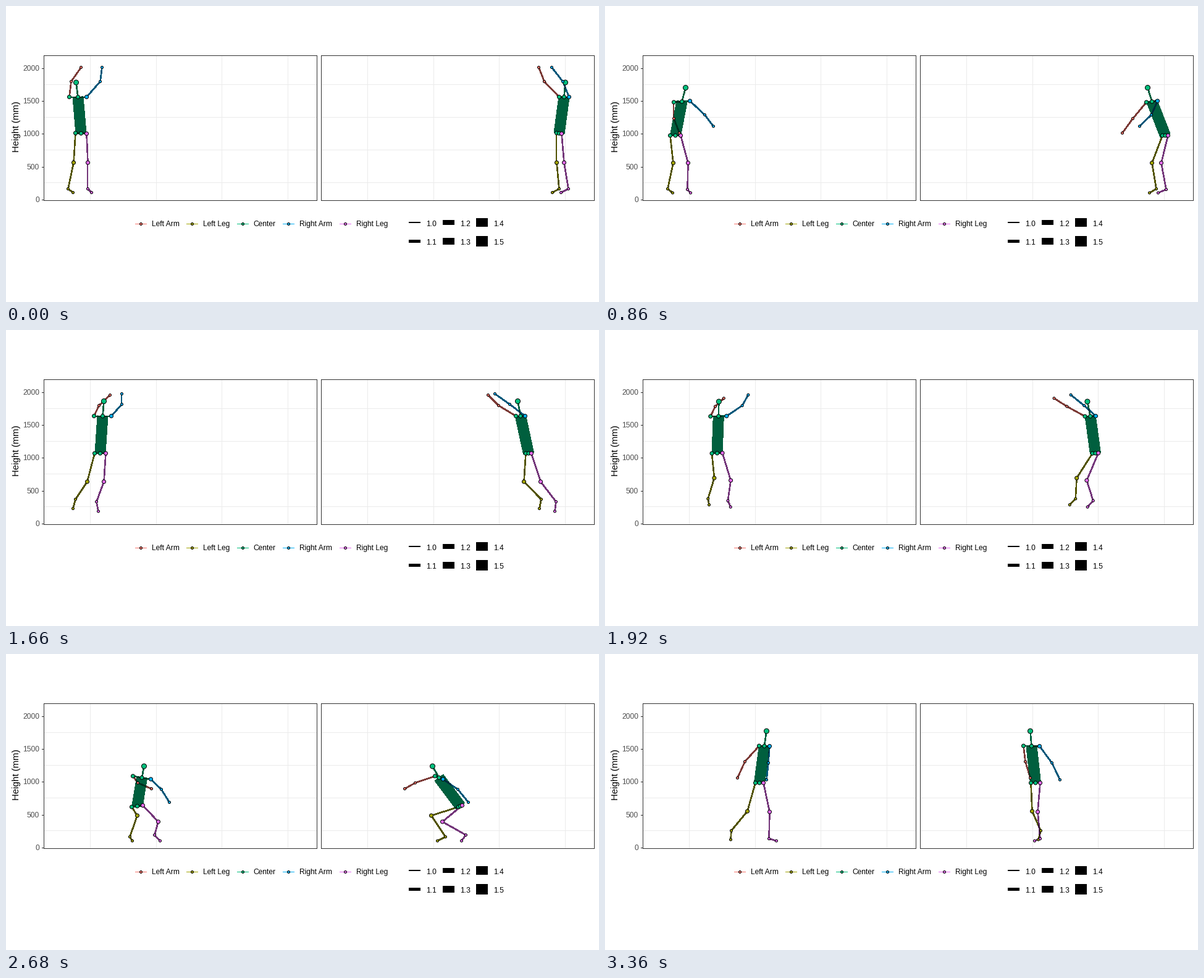
Write a matplotlib script that moves like this. It is 960 by 480 pixels and loops after 3380 ms.

```python
import numpy as np
import matplotlib.pyplot as plt
from matplotlib.animation import FuncAnimation
from matplotlib.collections import LineCollection
from matplotlib.patches import Rectangle

W, H, DPI = 960, 480, 80
PT = 72 / DPI  # points per pixel
STEP, FRAMES = 20, 169

plt.rcParams["font.family"] = "Liberation Sans"
HUES = dict(la="#F8766D", ll="#A3A500", c="#00BF7D", ra="#00B0F6", rl="#E76BF3")
LABELS = dict(la="Left Arm", ll="Left Leg", c="Center", ra="Right Arm", rl="Right Leg")

# Keyed joints: time in ms, then (x in left panel, x in right panel, y).
tracks = {}


def pose(t, **joints):
    for name, p in joints.items():
        tracks.setdefault(name, []).append((t, *p))


pose(0, head=(113, 905, 123.5), lsh=(102, 895, 147), rsh=(130, 911, 147),
     lel=(105, 871, 122), lwr=(121, 862, 99), rel=(152, 901, 122), rwr=(155, 883, 99),
     lhip=(112, 891, 205.5), rhip=(130, 899, 206.5),
     lkn=(109, 891, 253.5), lan=(100, 895, 296), lto=(108, 884, 302),
     rkn=(132, 903, 253.5), ran=(132, 910, 296), rto=(138, 898, 302))
pose(300, lsh=(104, 893, 144), rsh=(131, 909, 144), lel=(108, 869, 119),
     lwr=(124, 858, 94), rel=(153, 897, 118), rwr=(158, 878, 94))
pose(540, head=(120, 898, 122), lsh=(106, 890, 145), rsh=(133, 907, 145),
     lel=(112, 866, 121), lwr=(127, 853, 96), rel=(154, 893, 119), rwr=(160, 873, 96),
     lhip=(109, 895, 206), rhip=(127, 903, 206))
pose(860, head=(130, 878, 132), lsh=(111, 876, 155.5), rsh=(137, 894, 153.5),
     lel=(111, 854, 182), lwr=(120, 837, 205.5), rel=(161, 884, 176), rwr=(175, 865, 194.5),
     lhip=(105, 902, 209.5), rhip=(122, 911, 209.5),
     lkn=(110, 885, 254), lan=(101, 892, 296), lto=(109, 881, 302.5),
     rkn=(134, 900, 254), ran=(133, 908, 297), rto=(138, 895, 302.5))
pose(1080, head=(140, 863, 159), lsh=(117, 865, 177), rsh=(145, 882, 177),
     lel=(97, 892, 187), lwr=(82, 916, 193), rel=(138, 914, 184), rwr=(116, 932, 189),
     lhip=(106, 900, 222), rhip=(123, 909, 222))
pose(1300, head=(152, 844, 189), lsh=(127, 848, 200.5), rsh=(155, 864, 201.5),
     lel=(99, 869, 198), lwr=(83, 893, 202.5), rel=(148, 897, 195), rwr=(130, 921, 197.5),
     lhip=(110, 892, 230.5), rhip=(127, 902, 230.5),
     lkn=(124, 864, 265.5), lan=(106, 886, 297), lto=(112, 874, 303),
     rkn=(146, 877, 264.5), ran=(134, 902, 298), rto=(142, 890, 303))
pose(1480, head=(152, 841, 155), lsh=(132, 842, 177), rsh=(160, 858, 177),
     lel=(126, 850, 210), lwr=(132, 842, 237), rel=(170, 864, 209), rwr=(178, 856, 236),
     lhip=(120, 875, 222), rhip=(138, 885, 222))
pose(1540, lan=(107, 881, 290), lto=(111, 873, 303), ran=(137, 897, 291), rto=(143, 888, 303))
pose(1660, head=(158, 828, 115), lsh=(142, 825, 139), rsh=(170, 840, 139),
     lel=(150, 797, 122), lwr=(168, 780, 105), rel=(187, 815, 120), rwr=(187, 791, 103),
     lhip=(143, 841, 199.5), rhip=(161, 850, 199.5),
     lkn=(131, 838, 245.5), lan=(112, 866, 274), lto=(108, 863, 289),
     rkn=(158, 865, 245.5), ran=(146, 890, 278), rto=(149, 888, 293.5))
pose(1800, head=(172, 804, 105), lsh=(156, 800, 129), rsh=(184, 815, 129),
     lel=(167, 774, 110), lwr=(183, 758, 94), rel=(203, 791, 109), rwr=(204, 768, 91),
     lhip=(158, 814, 190), rhip=(175, 823, 190),
     lkn=(154, 796, 234), lan=(136, 824, 262), lto=(136, 818, 276),
     rkn=(177, 815, 237), ran=(165, 845, 266), rto=(167, 841, 281))
pose(2000, head=(190, 766, 127), lsh=(178, 762, 151), rsh=(203, 781, 150),
     lhip=(181, 774, 210), rhip=(198, 784, 209),
     lkn=(189, 744, 246), lan=(185, 728, 285), lto=(188, 716, 291),
     rkn=(218, 760, 250), ran=(222, 762, 287), rto=(228, 750, 293))
pose(2080, lan=(197, 716, 297), lto=(202, 702, 302), ran=(239, 752, 297), rto=(245, 739, 302))
pose(2200, head=(199, 740, 158), lsh=(188, 734, 182.5), rsh=(213, 754, 180.5),
     lel=(182, 700, 184), lwr=(187, 671, 186), rel=(245, 764, 186), rwr=(274, 768, 191.5),
     lhip=(195, 750, 239.5), rhip=(211, 761, 237.5),
     lkn=(208, 708, 255.5), lan=(197, 716, 297), lto=(202, 702, 302.5),
     rkn=(236, 728, 261.5), ran=(239, 752, 297), rto=(245, 739, 302.5))
pose(2400, head=(213, 701, 184), lsh=(197, 703, 201), rsh=(224, 718, 206),
     lhip=(198, 735, 255), rhip=(215, 744, 253))
pose(2680, head=(223, 690, 181.5), lsh=(205, 694, 197.5), rsh=(234, 707, 202.5),
     lel=(213, 662, 208.5), lwr=(235, 645, 218), rel=(251, 731, 219), rwr=(264, 748, 240),
     lhip=(203, 732, 247.5), rhip=(221, 738, 245),
     lkn=(212, 688, 261.5), lan=(200, 711, 296), lto=(204, 698, 302.5),
     rkn=(246, 706, 271.5), ran=(240, 744, 293), rto=(249, 737, 302.5))
pose(3100, ran=(250, 726, 291), rto=(260, 716, 298))
pose(3240, head=(252, 692, 122.5), lsh=(239, 683, 147), rsh=(259, 707, 146.5),
     rel=(258, 727, 174), rwr=(257, 738, 201), lhip=(234, 695, 207), rhip=(248, 708, 207),
     lan=(200, 711, 291), lto=(199, 700, 302), ran=(259, 708, 297), rto=(271, 699, 302))
pose(3360, head=(261, 688, 124.5), lsh=(249, 677, 148.5), rsh=(266, 703, 149),
     lel=(226, 680, 174), lwr=(214, 688, 200.5), rel=(264, 723, 176), rwr=(261, 736, 203.5),
     lhip=(243, 689, 208.5), rhip=(256, 704, 208.5),
     lkn=(230, 691, 254.5), lan=(204, 705, 286), lto=(203, 701, 300.5),
     rkn=(266, 700, 255.5), ran=(265, 704, 299), rto=(277, 695, 302.5))

MIDS = dict(neck=("lsh", "rsh"), mid=("lhip", "rhip"))
PARENTS = dict(head="neck", lel="lsh", rel="rsh", lwr="lel", rwr="rel", lkn="lhip", rkn="rhip")


def smooth(t, ts, ps):
    """Monotone cubic through the keys."""
    h = np.diff(ts)[:, None]
    d = np.diff(ps, axis=0) / h
    a, b = d[:-1], d[1:]
    same = a * b > 0
    inner = np.where(same, 2 * a * b / np.where(same, a + b, 1), 0)
    m = np.vstack([d[:1], inner, d[-1:]])
    i = np.clip(np.searchsorted(ts, t, side="right") - 1, 0, len(ts) - 2)
    u = ((t - ts[i]) / h[i, 0])[:, None]
    return (ps[i] * (1 + 2 * u) * (1 - u) ** 2 + ps[i + 1] * u ** 2 * (3 - 2 * u)
            + h[i] * (m[i] * u * (1 - u) ** 2 - m[i + 1] * u ** 2 * (1 - u)))


def path(name, t):
    if name in MIDS:
        return sum(path(n, t) for n in MIDS[name]) / 2
    keys = np.array(tracks[name], float)
    ts, ps = keys[:, 0], keys[:, 1:]
    if name not in PARENTS:
        return smooth(t, ts, ps)
    # Turn the bone about its parent and keep its length.
    parent = PARENTS[name]
    off = ps - path(parent, ts)
    v = smooth(t, ts, off)
    length = np.interp(t, ts, np.linalg.norm(off, axis=1))
    return path(parent, t) + v * (length / np.linalg.norm(v, axis=1))[:, None]


times = np.arange(FRAMES) * float(STEP)
joints = {n: path(n, times) for n in [*tracks, *MIDS]}

BONES = [("la", "lsh lel"), ("la", "lel lwr"),
         ("ll", "lhip lkn"), ("ll", "lkn lan"), ("ll", "lan lto"),
         ("c", "head neck"), ("c", "lsh neck"), ("c", "neck rsh"),
         ("c", "neck mid"), ("c", "lhip mid"), ("c", "mid rhip"),
         ("ra", "rsh rel"), ("ra", "rel rwr"),
         ("rl", "rhip rkn"), ("rl", "rkn ran"), ("rl", "ran rto")]
BONES = [(g, *ends.split()) for g, ends in BONES]
DOTS = dict(la="lel lwr", ll="lkn lan lto", c="head lsh neck lhip mid",
            ra="rsh rel rwr", rl="rhip rkn ran rto")
DOTS = [(g, n) for g, names in DOTS.items() for n in names.split()]
SIZES = dict(head=8, lsh=6, rsh=6, neck=6, lhip=6, rhip=6, mid=6, lkn=6, rkn=6)

fig = plt.figure(figsize=(W / DPI, H / DPI), dpi=DPI, facecolor="white")
ax = fig.add_axes([0, 0, 1, 1])
ax.axis("off")


def line(x0, y0, x1, y1, color, **kw):
    ax.plot([x0, x1], [y0, y1], color=color, lw=PT,
            solid_capstyle="butt", antialiased=False, **kw)


def text(x, y, s, color="black", **kw):
    ax.text(x, y, s, fontsize=12 * PT, color=color, va="center_baseline", **kw)


def panel(left):
    for y in (126, 179, 232, 285):
        line(left, y, left + 442, y, "#EBEBEB", zorder=1)
    for x in (75, 182, 288, 395):
        line(left + x, 79, left + x, 314, "#EBEBEB", zorder=1)
    ax.add_patch(Rectangle((left, 79), 442, 235, fill=False, ec="#333333",
                           lw=PT, antialiased=False, zorder=6))


panel(61)
panel(510)
for value, y in zip(range(0, 2001, 500), (313, 260, 206, 153, 100)):
    line(58, y, 61, y, "#333333")
    text(53.5, y - 0.5, str(value), color="#4D4D4D", ha="right")
ax.text(16.5, 195.5, "Height (mm)", fontsize=15 * PT, rotation=90, ha="center", va="center")

for (g, label), x, tx in zip(LABELS.items(), (218, 301, 383, 457, 549), (236, 319, 400, 475, 567)):
    line(x - 9, 352, x + 9, 352, HUES[g])
    ax.plot(x, 352, "o", ms=4 * PT, mfc=HUES[g], mec="black", mew=PT)
    text(tx, 352, label)

for k in range(6):
    x, row, size = (652, 707, 761)[k // 2], k % 2, 2 + 3 * k
    top = 351 + 30.5 * row - size / 2
    ax.add_patch(Rectangle((x - 0.5, top - 0.5), 19, size, color="black", lw=0))
    text(x + 28, 352 + 30 * row, f"{1 + k / 10:.1f}")

widths = [(17 if b[1:] == ("neck", "mid") else 1.6) * PT for b in BONES]


def bones(colors, z, **kw):
    return ax.add_collection(LineCollection(
        [], colors=colors, linewidths=widths, capstyle="butt",
        antialiaseds=False, zorder=z, **kw), autolim=False)


def figure():
    dots = ax.scatter([0] * len(DOTS), [0] * len(DOTS),
                      s=[(SIZES.get(n, 4) * PT) ** 2 for _, n in DOTS],
                      c=[HUES[g] for g, _ in DOTS], edgecolors="black",
                      linewidths=PT, zorder=5)
    return bones([HUES[b[0]] for b in BONES], 3), bones("black", 4, alpha=0.5), dots


views = [figure(), figure()]
# Whole numbers fall just short of pixel centres, so snapping never skips a pixel.
ax.set_xlim(-0.49, W - 0.49)
ax.set_ylim(H - 0.51, -0.51)


def draw(i):
    for axis, (hue, shade, dots) in enumerate(views):
        at = {n: p[i, [axis, 2]] for n, p in joints.items()}
        segments = [(at[a], at[b]) for _, a, b in BONES]
        hue.set_segments(segments)
        shade.set_segments(segments)
        dots.set_offsets([at[n] for _, n in DOTS])
    return [artist for view in views for artist in view]


anim = FuncAnimation(fig, draw, frames=FRAMES, interval=STEP, repeat=True, repeat_delay=0)
plt.show()
```
